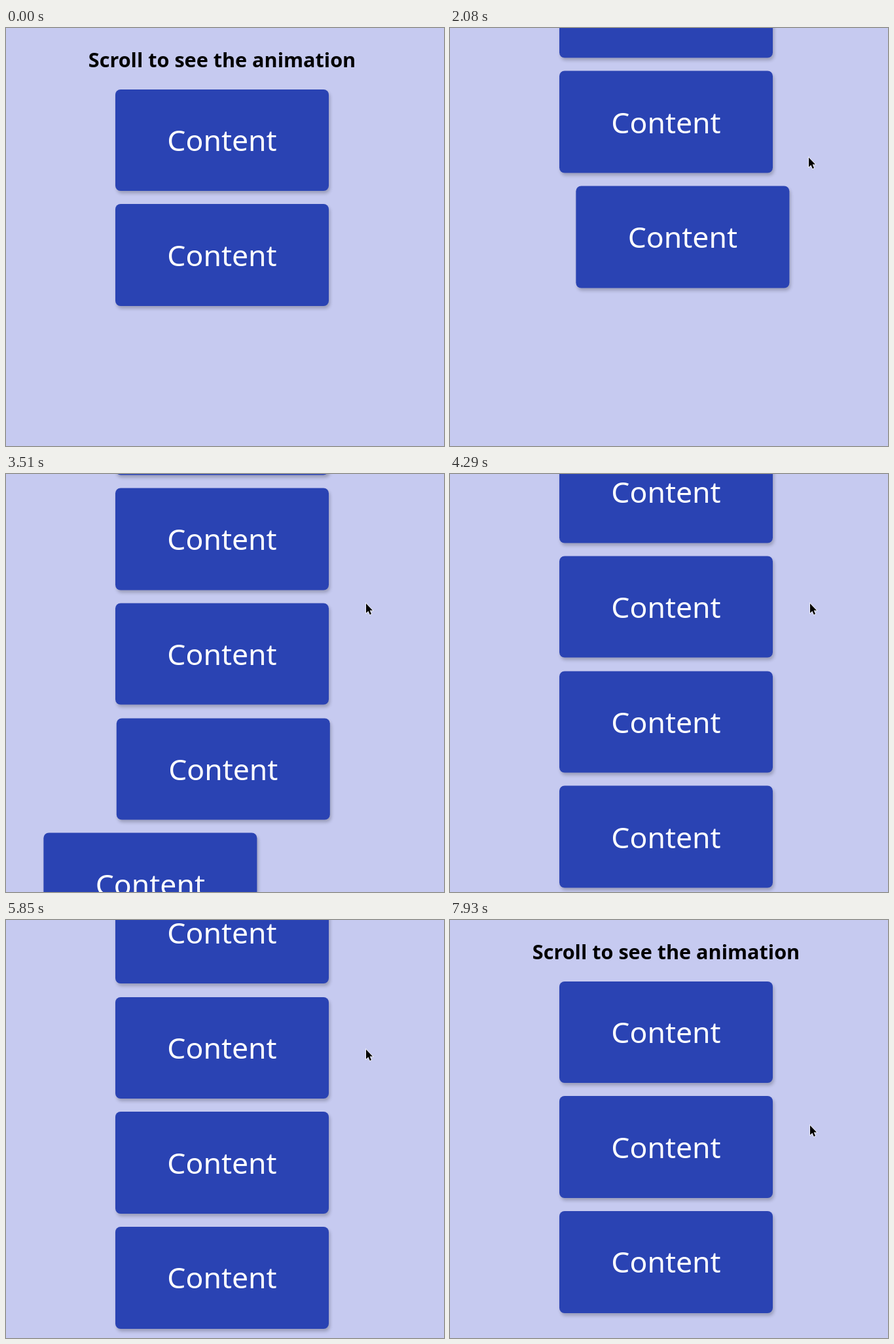
These frames come from a looping animation (669x639 px, 8 s). An HTML page:

```html
<!DOCTYPE html>
<html lang="en">
<head>
<meta charset="utf-8">
<title>Scroll animation</title>
<style>
  html, body { margin: 0; width: 100%; height: 100%; overflow: hidden; background: #c6caf0; }
  body { position: relative; font-family: "Noto Sans", sans-serif; }
  #page { position: absolute; inset: 0; }
  h1 {
    position: absolute; left: 0; top: 28px; width: 660px; margin: 0;
    font-size: 30.6px; line-height: 40px; text-align: center; white-space: nowrap; color: #000;
  }
  .box {
    position: absolute; left: 167px; width: 326px; height: 155.7px; padding-bottom: 2px;
    box-sizing: border-box; display: flex; align-items: center; justify-content: center;
    border-radius: 8px; background: #2a43b3; color: #fff; font-size: 44.5px;
    box-shadow: 2px 4px 5px rgba(0, 0, 0, .22);
  }
  #cursor { position: absolute; left: 0; top: 0; overflow: visible; }
</style>
</head>
<body>
<div id="page"><h1>Scroll to see the animation</h1></div>
<svg id="cursor" width="12" height="18">
  <path d="M0 0V14.5L3.4 11.4L5.8 17L8 16L5.7 10.6H10Z" stroke="#fff" stroke-width="1.4" paint-order="stroke"/>
</svg>
<script>
const LOOP = 8000, STEP = 130, SLIDE = 1000, AWAY = 1304;
const FIRST_TOP = 93.7, PITCH = 175.7;

// Keys are [time, value, ...]
const scrollKeys = [
  [780, 0], [910, 3], [1040, 10], [1430, 96], [1690, 178], [2210, 212], [2600, 253.3],
  [2860, 335], [3510, 423.5], [4290, 495.5], [4550, 545], [5590, 675], [5850, 679],
  [6370, 540], [6890, 0]
];
const cursorKeys = [
  [0, -14, 625], [130, 0, 613], [780, 540, 212], [910, 548, 198], [2600, 548, 198],
  [3510, 550, 198], [5850, 550, 198], [6370, 573, 250], [6890, 552, 312],
  [7540, 552, 312], [7670, 559, 306], [7930, 550, 314]
];
// Box number: [start of slide in, start of slide out]
const slides = {
  3: [1260], 4: [1784, 7020], 5: [2560, 6800], 6: [2860, 6420], 7: [4190, 6500]
};

function track(keys, t) {
  const next = keys.findIndex(k => k[0] > t);
  if (next === 0) return keys[0].slice(1);
  if (next < 0) return keys[keys.length - 1].slice(1);
  const a = keys[next - 1], b = keys[next];
  const p = (t - a[0]) / (b[0] - a[0]);
  return a.slice(1).map((v, i) => v + (b[i + 1] - v) * p);
}

// CSS "ease": cubic-bezier(.25, .1, .25, 1)
function ease(x) {
  if (x <= 0) return 0;
  if (x >= 1) return 1;
  const curve = (u, a, b) => 3 * (1 - u) ** 2 * u * a + 3 * (1 - u) * u * u * b + u ** 3;
  let lo = 0, hi = 1;
  for (let i = 0; i < 24; i++) {
    const mid = (lo + hi) / 2;
    if (curve(mid, .25, .25) < x) lo = mid; else hi = mid;
  }
  return curve(lo, .1, 1);
}

function offset(n, t) {
  if (n < 3) return 0;
  const [enter, leave = Infinity] = slides[n] || [Infinity];
  const hidden = 1 - ease((t - enter) / SLIDE) + ease((t - leave) / SLIDE);
  return (n % 2 ? 1 : -1) * AWAY * hidden;
}

const page = document.getElementById("page");
const cursor = document.getElementById("cursor");
const boxes = Array.from({ length: 10 }, (_, i) => {
  const box = document.createElement("div");
  box.className = "box";
  box.textContent = "Content";
  box.style.top = FIRST_TOP + i * PITCH + "px";
  page.append(box);
  return box;
});

function draw(now) {
  const t = Math.floor(now % LOOP / STEP) * STEP;
  page.style.transform = `translateY(${-track(scrollKeys, t)[0]}px)`;
  boxes.forEach((box, i) => {
    box.style.transform = `translateX(${offset(i + 1, t)}px)`;
  });
  const [x, y] = track(cursorKeys, t);
  cursor.style.transform = `translate(${x}px, ${y}px)`;
}

const start = performance.now();
function tick() {
  draw(performance.now() - start);
  requestAnimationFrame(tick);
}
tick();
</script>
</body>
</html>
```
